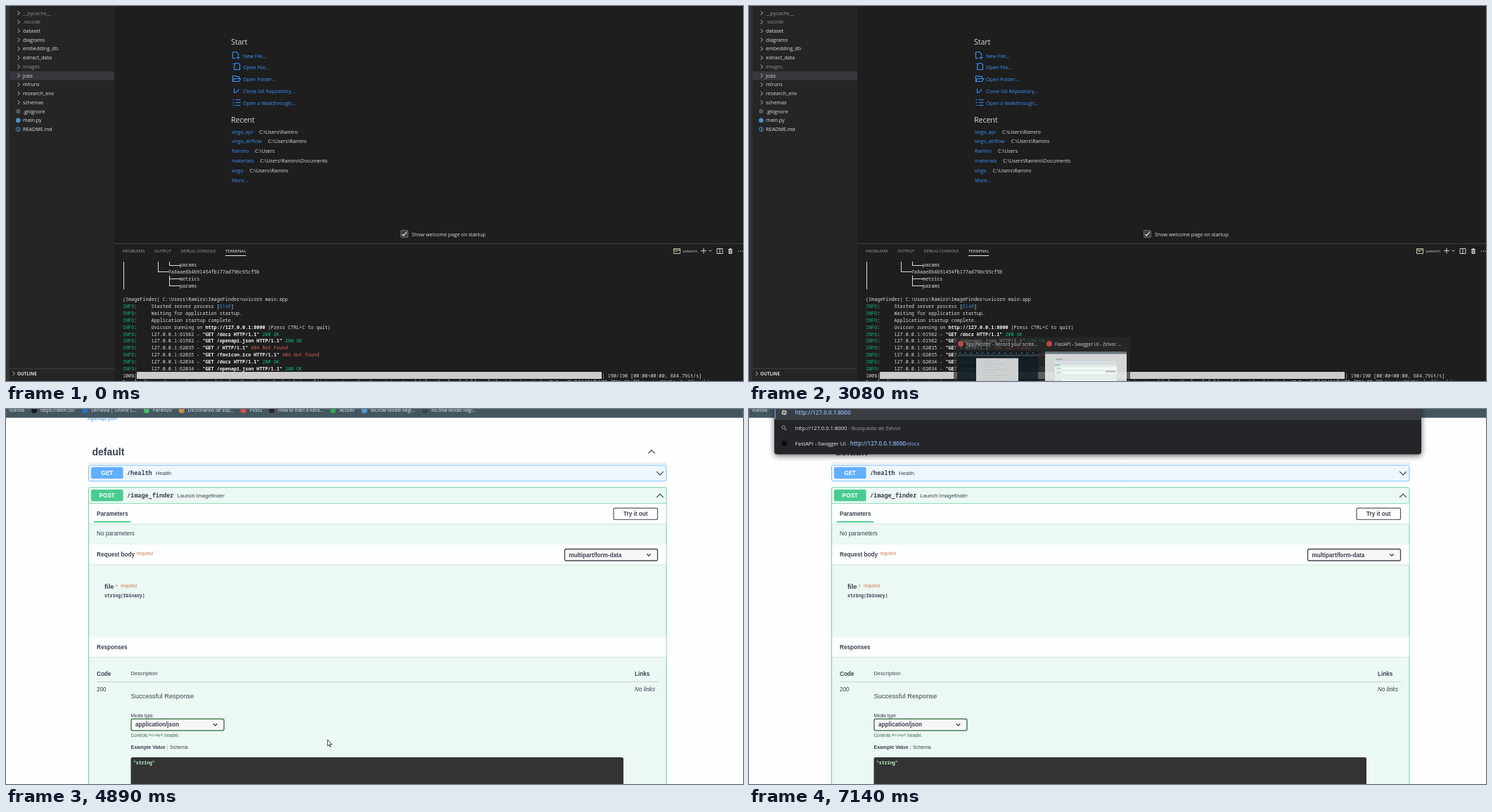
An HTML page with a canvas for the animation above (8000 ms loop, 1048 by 534 pixels).

```html
<!DOCTYPE html>
<html lang="en">
<head>
<meta charset="utf-8">
<style>
  html, body { margin: 0; width: 100%; height: 100%; overflow: hidden; background: #1e1e1e }
  canvas { display: block; width: 1048px; height: 534px }
</style>
</head>
<body>
<canvas id="stage" width="1048" height="534"></canvas>
<script>
const ctx = document.getElementById('stage').getContext('2d');
const W = 1048, H = 534, LOOP = 8000, STEP = 70;
const UI = "'Open Sans',sans-serif", WEB = "'Liberation Sans',sans-serif", MONO = "'Noto Sans Mono',monospace";
const INK = '#3b4151', LINK = '#3794ff', GREY = '#cccccc', LIGHT = '#dedede';

// y is the middle of the capital letters; returns where the text ends
function text(s, x, y, size, color, family = UI, style = '', align = 'left') {
  ctx.font = `${style} ${size}px ${family}`;
  ctx.fillStyle = color;
  ctx.textAlign = align;
  ctx.fillText(s, x, Math.round(y + size * .35));
  return x + ctx.measureText(s).width;
}
const web = (s, x, y, size = 8.16, style = '', color = INK, align) => text(s, x, y, size, color, WEB, style, align);
const bold = (s, x, y, size) => web(s, x, y, size, 'bold');

function rect(x, y, w, h, color) {
  ctx.fillStyle = color;
  ctx.fillRect(x, y, w, h);
}
function box(x, y, w, h, r, fill, stroke, width = 1) {
  ctx.beginPath();
  ctx.roundRect(x, y, w, h, r);
  if (fill) { ctx.fillStyle = fill; ctx.fill(); }
  if (stroke) { ctx.strokeStyle = stroke; ctx.lineWidth = width; ctx.stroke(); }
}
const dot = (x, y, r, fill, stroke) => box(x - r, y - r, 2 * r, 2 * r, r, fill, stroke, .9);

// strokes an SVG path with its origin at x, y
function draw(d, x, y, color, width = 1, fill) {
  const path = new Path2D(d);
  ctx.save();
  ctx.translate(x, y);
  if (fill) { ctx.fillStyle = fill; ctx.fill(path); }
  ctx.strokeStyle = color;
  ctx.lineWidth = width;
  ctx.stroke(path);
  ctx.restore();
}
const chevron = (x, y, w, dir, color, width = 1) =>
  draw(`M${-w} ${-dir * w / 2}L0 ${dir * w / 2}L${w} ${-dir * w / 2}`, x, y, color, width);
const chevronRight = (x, y) => draw('M-1.3-2.8L1.4 0L-1.3 2.8', x, y, '#c5c5c5');
const cross = (x, y, r, color) => draw(`M${-r}${-r}L${r} ${r}M${r}${-r}L${-r} ${r}`, x, y, color);

// ---------- editor ----------
function sidebar() {
  rect(0, 0, 154, H, '#252526');
  rect(0, 0, 5, H, '#333333');
  rect(5, 93, 149, 12.5, '#37373d');
  const names = ['__pycache__', '.vscode', 'dataset', 'diagrams', 'embedding_db', 'extract_data', 'images',
    'jobs', 'mlruns', 'research_env', 'schemas', '.gitignore', 'main.py', 'README.md'];
  const muted = ['__pycache__', '.vscode', 'images'], icons = ['#4d5a63', '#4596cc', '#519aba'];
  names.forEach((name, i) => {
    const y = 10 + i * 12.73;
    text(name, 24, y, 7.2, muted.includes(name) ? '#909090' : LIGHT);
    if (i < 11) chevronRight(18, y);
    else dot(17.3, y, 3, i < 13 && icons[i - 11], icons[i - 11]);
  });
  rect(17, 174, 1, 3.5, '#519aba');
  rect(5, 516, 149, 1, '#3c3c3d');
  chevronRight(11, 523.5);
  text('OUTLINE', 16, 523.5, 6.3, LIGHT, UI, 'bold');
}

function welcome() {
  text('Start', 320, 51, 10.5, LIGHT);
  const icons = ['M4 4H0V-5H5L8-2V0M5 3H10M7.5 .5V5.5', 'M2-1V4H10V-3L8-5H3M0-4H3V-1',
    'M0 4V-4H4L5-3H9V0M0 4L2 0H11L9 4Z', 'M2-3V3Q8 2 8-2', 'M0-4H2M4-4H11M0 0H2M4 0H11M0 4H2M4 4H11'];
  ['New File...', 'Open File...', 'Open Folder...', 'Clone Git Repository...', 'Open a Walkthrough...']
    .forEach((s, i) => {
      const y = 71 + i * 16.75;
      text(s, 337, y, 7.2, LINK);
      draw(icons[i], 322.5, Math.floor(y) - .5, LINK, 1.1);
    });
  text('Recent', 320, 162, 10.5, LIGHT);
  const home = 'C:\\Users', user = home + '\\Ramiro';
  Object.entries({ virgo_api: user, virgo_airflow: user, Ramiro: home, materials: user + '\\Documents',
    virgo: user, 'More...': '' }).forEach(([name, path], i) => {
    const y = 179 + i * 13.85;
    text(path, text(name, 321, y, 7.2, LINK) + 9, y, 7.2, LIGHT);
  });
  box(561.5, 319.5, 10, 10, 1.5, '#3c3c3c', '#6b6b6b');
  draw('M-3 .5L-1 2.5L3.3-3', 566.5, 324.5, '#f0f0f0', 1.2);
  text('Show welcome page on startup', 577, 325, 7.2, LIGHT);
}

function panelTabs() {
  rect(154, 338, W - 154, 1, '#414141');
  let x = 166;
  for (const tab of ['PROBLEMS', 'OUTPUT', 'DEBUG CONSOLE', 'TERMINAL']) {
    const active = tab == 'TERMINAL';
    const end = text(tab, x, 349, 6.1, active ? '#f0f0f0' : '#a5a5a5');
    if (active) rect(x, 355, end - x, 1, '#e7e7e7');
    x = end + 13.5;
  }
  const y = 348.5, color = '#cfcfcf';
  draw('M0-3H9V4H0ZM0-1H9M2 1H5', 949.5, y, '#cfc6a4');
  text('uvicorn', 962, y, 6, LIGHT);
  draw('M-4 0H4M0-4V4', 992, y, color);
  chevron(1001.5, y, 2, 1, color);
  draw('M-4-3H4V4H-4ZM0-3V4', 1015, y, color);
  draw('M-3-2H3M-2-2V4H2V-2M-1-3H1', 1030, y, color, 1, '#8a8a8a');
  for (let i = 0; i < 3; i++) rect(1041 + i * 3, y, 1.2, 1.2, color);
}

const CHAR = 4.05, LINE = 9.85, LEFT = 166;
// spans: [string, color, style], laid on the character grid
function row(y, col, ...spans) {
  for (const [s, color = LIGHT, style = ''] of spans) {
    text(s, LEFT + col * CHAR, y, CHAR / .6, color, MONO, style);
    col += s.length;
  }
}
// a directory line whose leading branch signs become joined strokes
function treeRow(s, y) {
  const label = s.search(/\w/);
  [...s.slice(0, label)].forEach((c, i) => {
    const x = Math.round(LEFT + i * CHAR) + 1;
    if ('│├└'.includes(c)) rect(x, y - LINE / 2, 1, c == '└' ? LINE / 2 : LINE, LIGHT);
    if ('─├└'.includes(c)) rect(x, Math.floor(y), CHAR, 1, LIGHT);
  });
  row(y, label, [s.slice(label)]);
}
function terminal() {
  ['│           │   └───params', '│           └───7a8aae8b4b91454fb177ad796c95cf5b',
    '│               ├───metrics', '│               └───params'].forEach((s, i) => treeRow(s, 369 + i * LINE));
  row(418, 0, ['(ImageFinder) C:\\Users\\Ramiro\\ImageFinder>uvicorn main:app']);
  const strong = s => [s, '#f4f4f4', 'bold'];
  const request = (port, path, ok) => [[`127.0.0.1:${port} - `], strong(`"GET ${path} HTTP/1.1"`),
    ok ? [' 200 OK', '#0dbc79'] : [' 404 Not Found', '#d9604c']];
  [
    [['Started server process ['], ['8140', '#2f7fd0'], [']']],
    [['Waiting for application startup.']],
    [['Application startup complete.']],
    [['Uvicorn running on '], strong('http://127.0.0.1:8000'), [' (Press CTRL+C to quit)']],
    request(61982, '/docs', true),
    request(61982, '/openapi.json', true),
    request(62035, '/', false),
    request(62035, '/favicon.ico', false),
    request(62034, '/docs', true),
    request(62034, '/openapi.json', true)
  ].forEach((spans, i) => {
    const y = 418 + (i + 1) * LINE;
    row(y, 0, ['INFO', '#0dbc79'], [':']);
    row(y, 10, ...spans);
  });
  row(526.3, 0, ['100%|']);
  rect(186, 521, 661, 10, GREY);
  row(526.3, 168.3, ['| 190/190 [00:00<00:00, 684.79it/s]']);
  row(536, 0, ['Downloading and preparing image data for the index, the batch is split in parts and each part is stored'
    + ' below the local folder of the job: data/index/7a8aae8b4b91454fb177ad796c95cf5b/parts/0140/embedding.bin']);
}

function editor() {
  rect(0, 0, W, H, '#1e1e1e');
  sidebar();
  welcome();
  panelTabs();
  terminal();
}

// ---------- browser ----------
function bookmarks() {
  rect(0, 0, W, 12.5, '#435761');
  const label = (s, x, align) => text(s, x, 2, 6.6, '#e8ecee', UI, '', align);
  label('Vuelixa', 26, 'right');
  let x = 40;
  for (const [s, color] of [['https://aeon.co/', '#15191c'], ['Lernavia | Online C...', '#2a73cc'],
    ['Parlenzo', '#3fc460'], ['Diccionarios de Esp...', '#c98a4b'], ['Postu', '#d9523f'],
    ['How to train a Kera...', '#2b2320'], ['Accueil', '#2fa84f'], ['MLflow Model Regi...', '#4b9bd8'],
    ['MLflow Model Regi...', '#39434a']]) {
    dot(x, 2, 4, color);
    x = label(s, x + 9) + 14;
  }
}

const PAGE = 117.5, WIDTH = 821.5, PAD = 129, COL = 177.5;

function operation(y, method, path, summary, color, dir, hovered) {
  box(121, y - 8.3, 45.5, 16.5, 2, color);
  web(method, 143.7, y, 8.16, 'bold', '#fff', 'center');
  web(summary, text(path, 172, y, 8.5, INK, MONO, 'bold') + 5.3, y, 7.6);
  chevron(hovered ? 914 : 930, y + .5, 4.8, dir, INK, 1.3);
  if (hovered) {
    box(925.5, y - 4, 7, 8.5, 1, null, INK);
    rect(927.5, y - 5, 3, 2, INK);
  }
}
function select(x, y, s, border) {
  box(x + .5, y + .5, 132, 16.5, 2, '#f7f7f7', border, 1.3);
  bold(s, x + 6.5, y + 8.8);
  chevron(x + 120, y + 8.8, 2.8, 1, '#222', 1.2);
}
function band(y, title) {
  rect(PAGE + .5, y, WIDTH - 1, 28.5, '#fdfffe');
  rect(PAGE + .5, y + 28.5, WIDTH - 1, 1, '#d5e5de');
  return bold(title, PAD, y + 14.5);
}
const required = (x, y) => web('required', x, y, 6.3, '', '#cf7a48');

function browser(hoverY) {
  const GREEN = '#49cc90';
  rect(0, 0, W, H, '#fefefe');
  web('/openapi.json', 116, 14, 7, '', '#4990e2');
  bookmarks();
  bold('default', 122.5, 61.5, 14);
  chevron(918, 61, 4.8, -1, INK, 1.3);
  rect(PAGE, 76.5, WIDTH, 1, '#d8d9dc');

  box(PAGE, 80, WIDTH, 22.7, 2, '#eef6fe', '#7dbdfb');
  operation(91, 'GET', '/health', 'Health', '#61affe', 1, hoverY > 80 && hoverY < 103);
  box(PAGE, 111.7, WIDTH, H, 2, '#ebf8f3', '#6dd3a6');
  rect(PAGE + .5, 134, WIDTH - 1, 1, '#8fdcbc');
  operation(123, 'POST', '/image_finder', 'Launch Imagefinder', GREEN, -1, hoverY > 111 && hoverY < 135);

  band(135, 'Parameters');
  rect(125, 159.7, 52.5, 2, GREEN);
  box(864, 141.2, 62.5, 16.3, 2, '#fefefe', '#55585f', 1.2);
  web('Try it out', 895.2, 149.3, 8.16, 'bold', INK, 'center');
  web('No parameters', PAD, 177.3);

  required(band(193, 'Request body') + 3, 205.5);
  select(794, 199, 'multipart/form-data', '#41444e');
  bold('file', 140, 253, 9.33);
  web('*', 156, 252.5, 7, '', '#d04030');
  required(163, 251.3);
  text('string($binary)', 140, 265.5, 6.4, INK, MONO, '600');

  band(324.5, 'Responses');
  bold('Code', PAD, 377);
  web('Description', COL, 376.8, 7.6);
  bold('Links', 894, 377);
  rect(PAD, 388, 798, 1, '#c6d2ce');
  web('200', PAD, 399.5);
  web('No links', 894, 399.5, 8.16, 'italic');
  web('Successful Response', COL, 408.7, 9.33);
  web('Media type', COL, 436.5, 6.4);
  select(COL, 440.8, 'application/json', '#2d6b3a');
  const hint = '#3a6650', y = 464.3;
  const end = text('Accept', web('Controls ', COL, y, 6.4, '', hint), y, 5.7, hint, MONO);
  web(' header.', end, y, 6.4, '', hint);
  bold('Example Value', COL, 482, 7);
  rect(229, 478, 1, 8, '#c5cfcb');
  web('Schema', 233, 482, 7);
  box(COL, 496, 700.5, 60, 2.5, '#333333');
  text('"string"', 181, 504, 6.4, '#b6f5c0', MONO, '600');
}

function addressList() {
  const BLUE = '#8ab4f8', WHITE = '#e8eaed', DIM = '#9aa0a6', url = 'http://127.0.0.1:8000';
  const plain = (s, x, y, color) => text(s, x, y, 7.6, color);
  const strong = (s, x, y) => text(s, x, y, 8, BLUE, UI, '600');
  const x = 65.5;
  ctx.save();
  ctx.shadowColor = 'rgba(0,0,0,.6)';
  ctx.shadowBlur = 8;
  ctx.shadowOffsetY = 2;
  box(36, -20, 920, 84.5, 4, '#242528');
  ctx.restore();
  rect(36, 0, 920, 15.5, '#3a3d41');
  rect(36.5, 0, 1.2, 14, '#7aa5e8');
  dot(50, 5, 3.6, '#c4c7cb');
  draw('M-3.5-1L3.5 1M.8-3.5L-1 3.5', 50, 5, '#3a3d41', .8);
  strong(url, x, 5);
  dot(49, 26, 2.3, null, DIM);
  draw('M1.7 1.8L4.2 4.3', 49, 26, DIM, 1.1);
  plain(' - Búsqueda de Zelvor', plain(url, x, 27, WHITE), 27, DIM);
  dot(50, 49, 3.8, '#0c0d0e');
  const dash = plain(' - ', plain('FastAPI - Swagger UI', x, 49, WHITE), 49, DIM);
  plain('/docs', strong(url, dash, 49), 49, BLUE);
}

// ---------- taskbar previews ----------
function darkThumb(x, y) {
  rect(x, y, 115, 50, '#0f1d24');
  rect(x, y + 5, 115, 2, '#42555f');
  for (let i = 0; i < 14; i++) rect(x + 3 + i * 8, y + 2, 2, 1.2, '#7d8c94');
  rect(x + 27, y + 10, 60, 40, '#f6f7f7');
  for (let i = 0; i < 8; i++) rect(x + 37, y + 14 + i * 4, 14 + i * 17 % 32, .8, '#b4b9bc');
}
function pageThumb(x, y) {
  rect(x, y, 116, 50, '#fbfdfd');
  rect(x, y, 116, 3, '#4f636e');
  rect(x + 15, y + 10, 10, 1.2, '#8a8f98');
  rect(x + 14, y + 14, 88, 2, '#d7e8f7');
  rect(x + 14, y + 18, 88, 32, '#e4f3ec');
  rect(x + 14, y + 18, 7, 2, '#79c9a4');
  for (const dy of [22, 28, 40]) {
    rect(x + 14, y + dy, 88, 3, '#fdfefe');
    rect(x + 16, y + dy + 1, 7, 1, '#8a8f98');
  }
  rect(x + 86, y + 27, 14, 2, '#9da5a8');
}
function previews(alpha, dy, hovered) {
  ctx.save();
  ctx.translate(0, dy);
  ctx.globalAlpha = alpha ** 2;
  rect(291, 469, 251, 70, '#292a2b');
  ctx.globalAlpha = alpha;
  if (hovered) {
    rect(417, 469, 125, 70, '#4b4c4d');
    cross(532, 478.5, 3, '#f0f0f0');
  }
  ['ReelNestler - Record your scree...', 'FastAPI - Swagger UI - Z' + (hovered ? '...' : 'elvor ...')]
    .forEach((title, i) => {
      const x = 301 + i * 126;
      dot(x, 478.5, 4, '#dd5144');
      text(title, x + 8, 478.5, 6.6, '#f4f4f4');
    });
  darkThumb(296, 489);
  pageThumb(421, 490);
  ctx.restore();
}

// ---------- pointer ----------
// key points: [time, x, y]; the pointer shows only between the first and the last
const beamKeys = [[180, 990, 529], [450, 502, 438], [1800, 502, 438], [2010, 448, 499]];
const arrowKeys = [[3620, 500, 526], [3690, 482, 513], [4750, 482, 513], [5450, 244, 108],
  [5600, 251, 89], [5880, 270, -30]];

// eased position between key points, moving in steps as the screen was sampled
function along(keys, t) {
  const i = keys.findIndex(key => key[0] > t);
  if (i < 1) return null;
  const [t0, x0, y0] = keys[i - 1], [t1, x1, y1] = keys[i];
  const u = Math.floor((t - t0) / STEP) * STEP / (t1 - t0);
  const e = u * u * (3 - 2 * u);
  return [x0 + (x1 - x0) * e, y0 + (y1 - y0) * e];
}

function frame(t) {
  const beam = along(beamKeys, t), arrow = along(arrowKeys, t);
  if (t < 3960) editor();
  else browser(t >= 4820 && arrow ? arrow[1] : -1);
  if (t >= 7070) addressList();
  if (t >= 3080 && t < 4420) {
    const shown = Math.min(1, Math.floor((t - 3080) / STEP) / 2);
    previews(t < 4290 ? .82 + .18 * shown : .45, 2.5 * (1 - shown), t >= 3620);
  }
  if (beam) draw('M0-4V4M-2.5-4H2.5M-2.5 4H2.5', ...beam, '#d8d8d8');
  if (arrow) draw('M0 0V9L2 7.2L3.4 10.2L4.7 9.6L3.4 6.7H6.2Z', ...arrow, '#111', .8, '#fff');
}

const start = performance.now();
function tick() {
  frame((performance.now() - start) % LOOP);
  requestAnimationFrame(tick);
}
tick();
</script>
</body>
</html>
```
